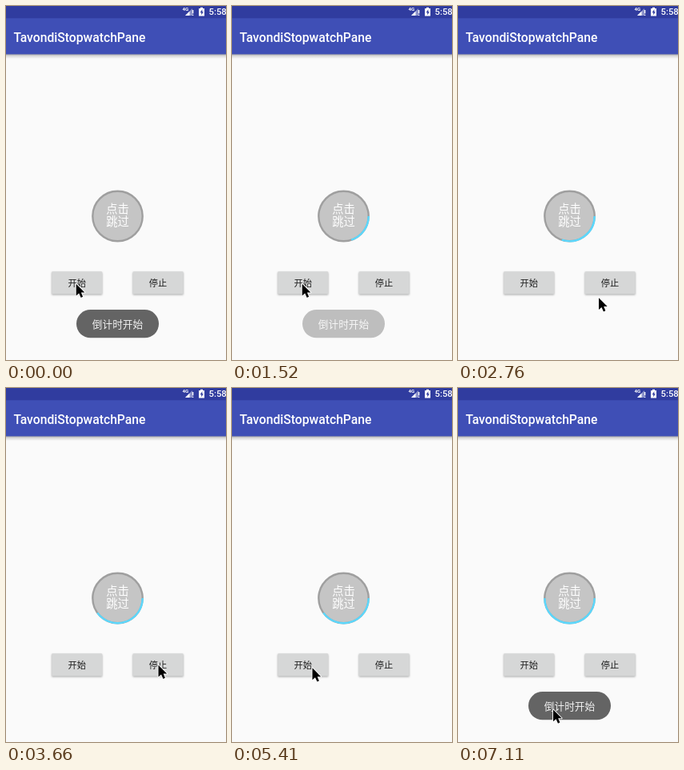
Recreate the animation shown at these times as an HTML page. Size 275x443 px, loop 8000 ms.

```html
<!DOCTYPE html>
<html lang="zh-CN">
<head>
<meta charset="utf-8">
<style>
html, body { margin: 0; width: 100%; height: 100%; overflow: hidden; background: #fafafa; }
svg { display: block; }
text { font-family: Roboto, "Noto Sans CJK SC", "Noto Sans CJK", sans-serif; }
.mid { text-anchor: middle; }
.button rect { fill: #d6d7d7; filter: drop-shadow(0 1px 1px rgba(0, 0, 0, .32)); }
.button.pressed rect { filter: drop-shadow(0 2px 2px rgba(0, 0, 0, .42)); }
.button text { font-size: 11.2px; font-weight: 500; fill: #1c1c1c; }
</style>
</head>
<body>
<svg width="275" height="443" viewBox="0 0 275 443">
  <defs>
    <linearGradient id="shade" x2="0" y2="1">
      <stop stop-color="#000" stop-opacity=".36"/>
      <stop offset=".4" stop-color="#000" stop-opacity=".14"/>
      <stop offset="1" stop-color="#000" stop-opacity="0"/>
    </linearGradient>
  </defs>
  <rect width="275" height="443" fill="#fafafa"/>
  <rect y="60" width="275" height="6" fill="url(#shade)"/>
  <rect width="275" height="60.4" fill="#3f4fb6"/>
  <rect width="275" height="15.3" fill="#303c9f"/>
  <text x="9.5" y="45" font-size="15.7" font-weight="500" fill="#fff">TavondiStopwatchPane</text>

  <g fill="#fff">
    <text x="220.5" y="6.2" font-size="6.2" font-weight="700">4G</text>
    <path d="M224 12 233 3V12Z" opacity=".45"/>
    <path d="M224 12 229.5 6.5V12ZM233 5h1.3v4.5H233ZM233 10.7h1.3V12H233Z"/>
    <path d="M241 3h2V1.8h3V3h2v9.5h-7Z"/>
    <path d="M245.3 4.3 242.6 8.2h1.6v3l2.6-4h-1.5Z" fill="#303c9f"/>
    <text x="253.5" y="11" font-size="11.3" font-weight="500">5:58</text>
  </g>

  <circle cx="139.5" cy="263" r="31.2" fill="#c5c5c5" stroke="#9f9f9f" stroke-width="2.4"/>
  <path id="arc" fill="none" stroke="#5bd8fd" stroke-width="2.4"/>
  <g class="mid" font-size="14.3" fill="#fff">
    <text x="139.5" y="259">点击</text>
    <text x="139.5" y="275.3">跳过</text>
  </g>

  <g class="button" id="start">
    <rect x="57.2" y="332.3" width="63" height="28.3" rx="1.2"/>
    <text class="mid" x="88.8" y="350.6">开始</text>
  </g>
  <g class="button" id="stop">
    <rect x="158.6" y="332.3" width="63" height="28.3" rx="1.2"/>
    <text class="mid" x="190" y="350.6">停止</text>
  </g>

  <g id="toast">
    <rect x="88" y="380" width="103" height="35.3" rx="17.6" fill="#646464"/>
    <text class="mid" x="139.5" y="402.6" font-size="12.7" fill="#f1f1f1">倒计时开始</text>
  </g>

  <path id="cursor" d="M0 0V14.8L3.5 11.8 6 17.2 8.4 16.1 6.2 10.8H10.7Z" stroke="#fff" stroke-width="1.8" stroke-linejoin="round" paint-order="stroke"/>
</svg>
<script>
const LOOP = 8000, STEP = 87, TICK = 980;
const CX = 139.5, CY = 263, R = 31.2;
const $ = id => document.getElementById(id);

// Moves: start time, number of steps, end point and the bend of the path.
const cursorMoves = [
  { at: 2500, steps: 5, to: [182.5, 358.5], via: [153, 395] },
  { at: 3480, steps: 3, to: [190.5, 346.7], via: [187, 350] },
  { at: 4090, steps: 5, to: [166, 388], via: [188, 372] },
  { at: 4890, steps: 9, to: [92, 346.5], via: [125, 361] },
  { at: 6490, steps: 4, to: [119, 402.5], via: [102, 375] }
];
const toastFades = [
  { at: 1340, steps: 5, to: .06 },
  { at: 2230, steps: 1, to: 0 },
  { at: 6220, steps: 4, to: 1 }
];

const smooth = k => k * k * (3 - 2 * k);
const mix = (a, b, k) => a + (b - a) * k;
const within = (t, from) => t >= from && t < from + 90;

// The screen refreshes in steps, so progress is quantised before easing.
function progress({ at, steps }, t) {
  const done = Math.floor((t - at + 3) / STEP) + 1;
  return smooth(Math.min(1, Math.max(0, done / steps)));
}

function cursorAt(t) {
  return cursorMoves.reduce((from, move) => {
    const k = progress(move, t);
    return from.map((a, i) => mix(mix(a, move.via[i], k), mix(move.via[i], move.to[i], k), k));
  }, [87.7, 347.7]);
}

function ticksAt(t) {
  const firstRun = Math.floor((t - 270) / TICK) + 1;
  return Math.min(4, firstRun) + (t >= 7110);
}

function draw(now) {
  const t = now % LOOP;
  const angle = ticksAt(t) * Math.PI / 5;
  const x = CX + R * Math.cos(angle), y = CY + R * Math.sin(angle);
  $("arc").setAttribute("d", angle ? `M${CX + R} ${CY}A${R} ${R} 0 0 1 ${x} ${y}` : "");
  $("toast").setAttribute("opacity", toastFades.reduce((a, fade) => mix(a, fade.to, progress(fade, t)), 1));
  $("cursor").setAttribute("transform", `translate(${cursorAt(t)})`);
  $("stop").classList.toggle("pressed", within(t, 3830));
  $("start").classList.toggle("pressed", within(t, 6040));
}

const begin = performance.now();
function frame() {
  draw(performance.now() - begin);
  requestAnimationFrame(frame);
}
frame();
</script>
</body>
</html>
```
